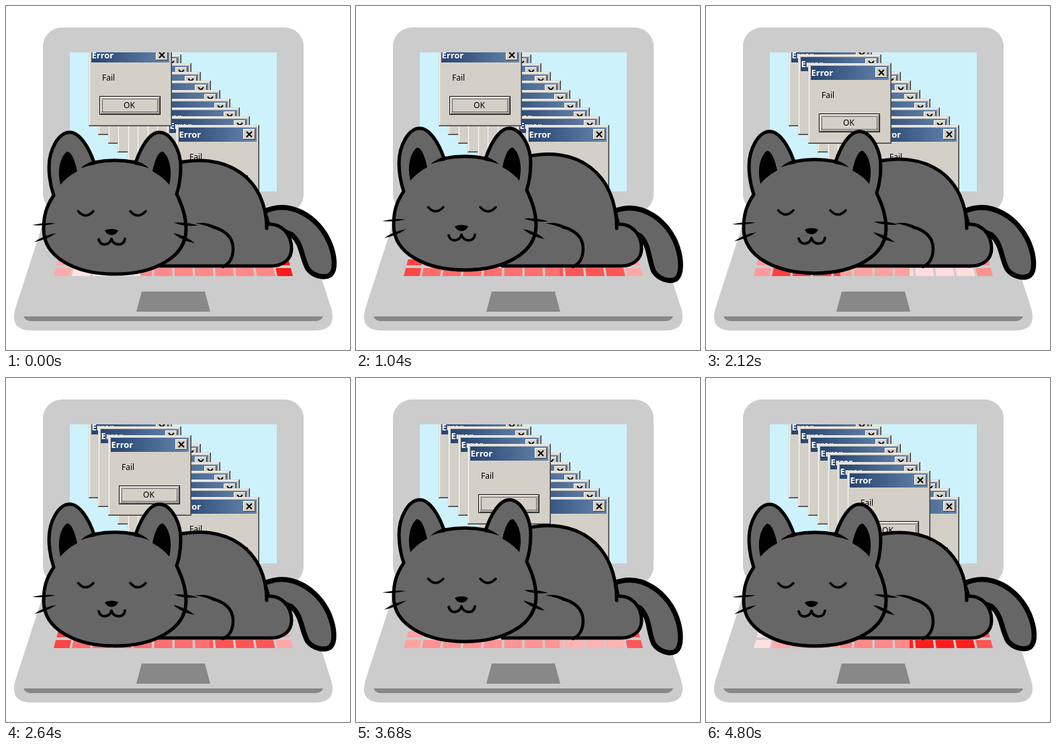
An HTML page that plays this animation: 512 by 512 pixels, repeating every 4840 ms.

```html
<!DOCTYPE html>
<html lang="en">
<head>
<meta charset="utf-8">
<title>Cat on a laptop</title>
<style>
  html, body { margin: 0; width: 100%; height: 100%; overflow: hidden; background: #fff; }
  svg { display: block; width: 100vw; height: 100vh; }
  text { font: 12px "Noto Sans", "Open Sans", sans-serif; }
  .title { font-weight: bold; font-size: 13px; fill: #fff; }
  .fur { fill: #666; stroke: #000; stroke-width: 5; stroke-linejoin: round; }
  .line { fill: none; stroke: #000; stroke-linecap: round; stroke-linejoin: round; }
</style>
</head>
<body>
<svg viewBox="0 0 512 512">
  <defs>
    <linearGradient id="bar"><stop stop-color="#28446f"/><stop offset="1" stop-color="#6586ad"/></linearGradient>
    <clipPath id="screen"><path d="M95 69H403V276H95Z"/></clipPath>
    <clipPath id="keyClip"><path id="keyShape"/></clipPath>
    <g id="dialog">
      <path fill="#404040" d="M0 0H124V120H0Z"/>
      <path fill="#d4d0c8" d="M0 0H123V119H0Z"/>
      <path fill="#808080" d="M1 1H123V119H1Z"/>
      <path fill="#fff" d="M1 1H122V118H1Z"/>
      <path fill="#d4d0c8" d="M2 2H122V118H2Z"/>
      <path fill="url(#bar)" d="M4 4H120V25H4Z"/>
      <text class="title" x="4.5" y="19">Error</text>
      <path fill="#404040" d="M100 6H118V22H100Z"/>
      <path fill="#fff" d="M100 6H117V21H100Z"/>
      <path fill="#d4d0c8" d="M101 7H117V21H101Z"/>
      <path stroke="#000" stroke-width="2" d="M105 10L113 18M113 10L105 18"/>
      <text x="20" y="52">Fail</text>
      <path d="M16 75H107V103H16Z"/>
      <path fill="#fff" d="M17 76H106V102H17Z"/>
      <path fill="#808080" d="M18 77H106V102H18Z"/>
      <path fill="#d4d0c8" d="M18 77H104V100H18Z"/>
      <path fill="none" stroke="#000" stroke-dasharray="1 1" d="M20 79.500H103M20 98.500H103M20.500 79V99M102.500 79V99"/>
      <text x="60.5" y="93" text-anchor="middle">OK</text>
    </g>
    <g id="earParts">
      <path d="M133 230Q120 233 111 241.500Q122 237 133 236Z"/>
      <path d="M90 217C80 226 76 246 81 266Q91 254 106 246C103 231 97 215 90 217Z"/>
    </g>
  </defs>

  <rect x="55" y="32" width="388" height="276" rx="28" fill="#ccc"/>
  <path fill="#cef2fc" d="M95 69H403V276H95Z"/>
  <g clip-path="url(#screen)"><g id="stack"></g></g>
  <path fill="#ccc" d="M60 308L14 450Q5 482 36 483H462Q493 482 484 450L438 308Z"/>
  <path fill="#888" d="M202 425H296L304 455H194ZM26 462H472Q469 469 461 469H37Q29 469 26 462Z"/>
  <g id="keys" clip-path="url(#keyClip)"></g>

  <path id="tail" class="fur" style="stroke-width:7.5" d="M384 306C424 287 465 315 481 351C490 372 491 393 483 400C474 406 457 402 449 391C439 372 441 354 425 340L390 326Z"/>
  <path id="body" class="fur"/>
  <path class="line" stroke-width="4.500" d="M308 329C324 333 338 343 338 361C338 375 332 384 323 388"/>
  <path d="M282 323.500Q298 321 311 327.500L308 331Q296 325.500 282 323.500Z"/>

  <g id="head">
    <path class="fur" d="M131 233C124 212 110 188 95 188C78 188 64 214 64 240C64 258 67 270 71 282C60 298 56 312 56 332C56 375 105 399 162 399C219 399 268 375 268 332C268 312 262 296 254 280C258 268 260 254 260 240C260 214 245 188 228 188C213 188 200 212 193 233C173 229 151 229 131 233Z"/>
    <use href="#earParts"/>
    <use href="#earParts" transform="matrix(-1 0 0 1 324 0)"/>
    <path class="line" stroke-width="3.600" d="M107.500 305.500Q118.500 318 130 305.500M185 305.500Q196 318 208 305.500"/>
    <path d="M147 334Q157 329.500 167 334Q164 341 157 341Q150 341 147 334Z"/>
    <path class="line" stroke-width="3.800" d="M138 347.500Q140 355 147 355Q155 354 157 346.500Q159 354 167 355Q176 355 177 346.500"/>
    <path d="M39 326Q56 322 74 323.500Q58 328 39 326ZM42 351.500Q56 341 75 338Q60 348 42 351.500ZM250 322.500Q268 321 286 326.500Q266 329 250 322.500ZM249 338Q268 342 281 353Q262 350 249 338Z"/>
  </g>
</svg>
<script>
const FRAME = 40, FRAMES = 121, LOOP = FRAME * FRAMES;
const BREATH = LOOP / 2;
const KEY_CYCLE = LOOP / 12;
const WINDOW_STEP = 50, WINDOWS = 10;

const $ = id => document.getElementById(id);
function add(parent, tag, attrs) {
  const el = document.createElementNS('http://www.w3.org/2000/svg', tag);
  for (const name in attrs) el.setAttribute(name, attrs[name]);
  return parent.appendChild(el);
}

// Cascade of dialogs, the newest on top
const dialogs = Array.from({ length: WINDOWS }, (_, i) => add($('stack'), 'use', {
  href: '#dialog',
  x: Math.round(123 + 14.45 * i),
  y: Math.round(58.6 + 13.2 * i)
}));
let shown = -1;
function showDialog(top) {
  if (top === shown) return;
  shown = top;
  for (let i = 1; i <= WINDOWS; i++) $('stack').append(dialogs[(top + i) % WINDOWS]);
}

// Keyboard rows in slight perspective
function keyPath() {
  const px = (x, y) => (249 + (x - 249) * (1 - (402 - y) * 0.00146)).toFixed(1);
  let d = '';
  for (const [top, bottom] of [[377, 386], [390, 402]])
    for (let i = 0; i < 12; i++) {
      const left = i ? 98 + 30.6 * (i - 1) : 71;
      const right = i === 11 ? 427 : 94.5 + 30.6 * i;
      d += `M${px(left, bottom)} ${bottom}L${px(left, top)} ${top}H${px(right, top)}L${px(right, bottom)} ${bottom}Z`;
    }
  return d;
}
$('keyShape').setAttribute('d', keyPath());

// Paleness of each strip of keys at the stops of one cycle
const STOPS = [0, 2, 4, 7, 9, 10];
const STRIPS = [
  [70, 97, [170, 153, 24, 160, 224]],
  [97, 200, [226, 64, 85, 150, 170]],
  [200, 303, [136, 160, 155, 24, 136]],
  [303, 402, [136, 221, 75, 105, 28]],
  [402, 430, [28, 145, 170, 160, 85]]
].map(([x, end, tones]) => ({
  tones: [...tones, tones[0]],
  el: add($('keys'), 'rect', { x, y: 370, width: end - x, height: 36 })
}));
function paintKeys(step) {
  const n = STOPS.findIndex(s => s > step) - 1;
  const mix = (step - STOPS[n]) / (STOPS[n + 1] - STOPS[n]);
  for (const { tones, el } of STRIPS) {
    const c = Math.round(tones[n] + (tones[n + 1] - tones[n]) * mix);
    el.setAttribute('fill', `rgb(255,${c},${c})`);
  }
}

const swell = t => (1 - Math.cos(2 * Math.PI * t / BREATH)) / 2;

function poseCat(t) {
  const b = 10.5 * swell(t - 45);
  $('body').setAttribute('d',
    `M218 387V300L245 ${236 - b}C331 ${213 - b} 388 ${259 - 0.8 * b} 388 331V325` +
    'C410 322 425 340 425 361C425 378 411 387 394 387Z');
  $('head').setAttribute('transform', `translate(0 ${-6.7 * swell(t - 60)})`);
  $('tail').setAttribute('transform', `rotate(${4.6 * swell(t)} 395 315)`);
}

function draw(now) {
  const t = Math.floor(now / FRAME) % FRAMES * FRAME;
  showDialog(Math.floor(t / WINDOW_STEP) % WINDOWS);
  paintKeys(Math.floor(t % KEY_CYCLE / KEY_CYCLE * 10));
  poseCat(t);
}

const start = performance.now();
function tick() {
  draw(performance.now() - start);
  requestAnimationFrame(tick);
}
tick();
</script>
</body>
</html>
```
